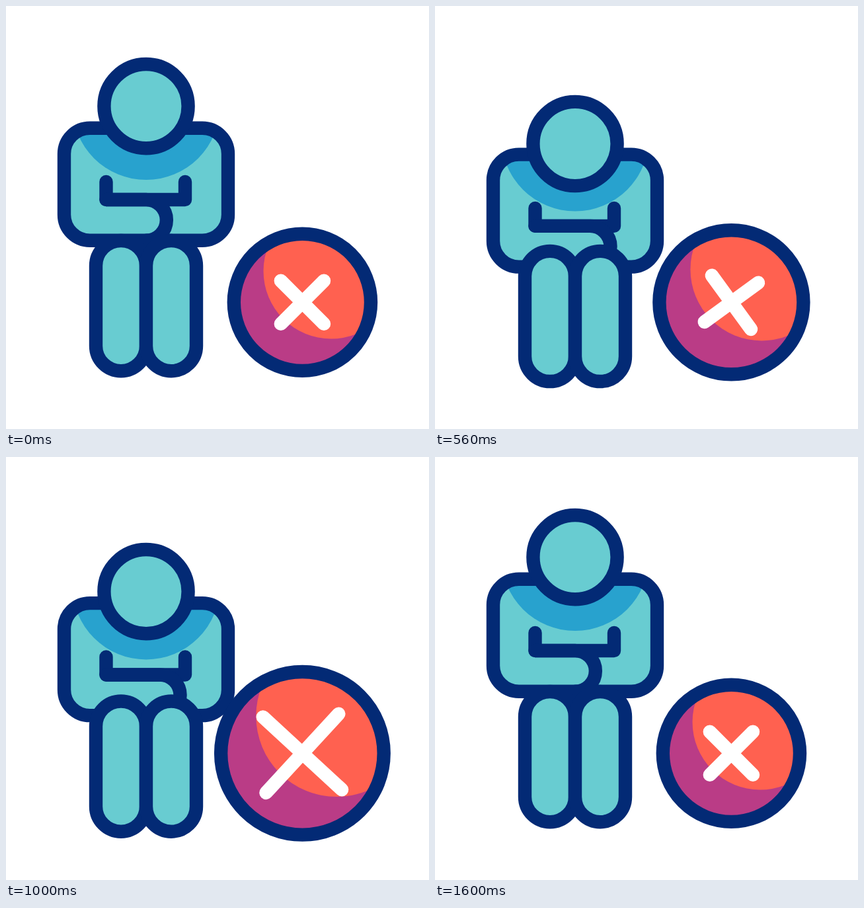
These frames come from a looping animation (640x640 px, 1680 ms). An HTML page:

```html
<!DOCTYPE html>
<html lang="en">
<head>
<meta charset="utf-8">
<title>Hunched figure</title>
<style>
  html, body { margin: 0; height: 100%; overflow: hidden; background: #fff; }
  svg { display: block; width: 100%; height: 100%; }
  .line { stroke: #032a75; stroke-width: 20.4; stroke-linecap: round; stroke-linejoin: round; }
  .skin { fill: #68ccd1; }
  .none { fill: none; }
</style>
</head>
<body>
<svg viewBox="0 0 640 640">
  <defs>
    <clipPath id="torso"><rect x="88" y="184.7" width="248" height="170" rx="39"/></clipPath>
    <clipPath id="disc"><circle r="103.6"/></clipPath>
  </defs>

  <g id="body">
    <rect class="skin" x="88" y="184.7" width="248" height="170" rx="39"/>
    <g clip-path="url(#torso)"><circle id="shade" cx="212" cy="151.6" r="111.5" fill="#28a2ce"/></g>
    <rect class="line none" x="88" y="184.7" width="248" height="170" rx="39"/>
    <path class="line none" d="M151.5 266V293H271V266"/>
    <path class="line none" id="hand"/>
  </g>
  <g id="legs" class="line skin">
    <rect x="136" y="355" width="76" height="197.2" rx="38"/>
    <rect x="212" y="355" width="76" height="197.2" rx="38"/>
  </g>
  <circle id="head" class="line skin" cx="212" cy="151.6" r="63.6"/>

  <g transform="translate(448.4 448.3)">
    <g id="fill" clip-path="url(#disc)">
      <circle r="103.6" fill="#ba3c86"/>
      <circle cx="43.6" cy="-47.3" r="102.5" fill="#ff6150"/>
    </g>
    <circle id="ring" class="line none"/>
    <path id="cross" fill="none" stroke="#fff" stroke-width="20.4" stroke-linecap="round"/>
  </g>
</svg>
<script>
const LOOP = 1680, STEP = 40;
const $ = id => document.getElementById(id);
const set = (id, name, value) => $(id).setAttribute(name, value);
const drop = (id, y) => set(id, 'transform', `translate(0 ${y})`);

// cubic-bezier(.575, 0, .425, 1)
function ease(x) {
  if (x <= 0) return 0;
  if (x >= 1) return 1;
  let lo = 0, hi = 1, u;
  for (let i = 0; i < 24; i++) {
    u = (lo + hi) / 2;
    const v = 1 - u;
    if (3 * v * v * u * .575 + 3 * v * u * u * .425 + u * u * u < x) lo = u;
    else hi = u;
  }
  return u * u * (3 - 2 * u);
}

// keys: [time, value] pairs, eased between neighbours
function track(t, keys) {
  let value = keys[0][1];
  for (let i = 1; i < keys.length; i++) {
    const [t0, v0] = keys[i - 1], [t1, v1] = keys[i];
    if (t >= t0) value = v0 + (v1 - v0) * ease((t - t0) / (t1 - t0));
  }
  return value;
}

function draw(t) {
  const bend = track(t, [[80, 0], [760, 1], [1440, 0]]);
  const r = track(t, [[360, 103.6], [880, 124.8], [1400, 103.6]]);
  const arm = track(t, [[400, 46.1], [960, 81.3], [1520, 46.1]]);
  const spin = track(t, [[240, 0], [680, 10], [1160, -5], [1600, 0]]);

  drop('head', 65.3 * bend);
  drop('body', 45.8 * bend);
  drop('shade', 8.7 * bend);
  drop('legs', 18.2 * bend);
  const x = 212 + 26 * bend;
  set('hand', 'd', `M151.5 293H${x}A30.85 30.85 0 0 1 ${x} 354.7`);

  set('fill', 'transform', `scale(${r / 103.6})`);
  set('ring', 'r', r);
  set('cross', 'd', `M${-arm} 0H${arm}M0 ${-arm}V${arm}`);
  set('cross', 'transform', `rotate(${45 + spin})`);
}

const start = performance.now();
function tick() {
  const t = (performance.now() - start) % LOOP;
  draw(Math.floor(t / STEP) * STEP);
  requestAnimationFrame(tick);
}
tick();
</script>
</body>
</html>
```
